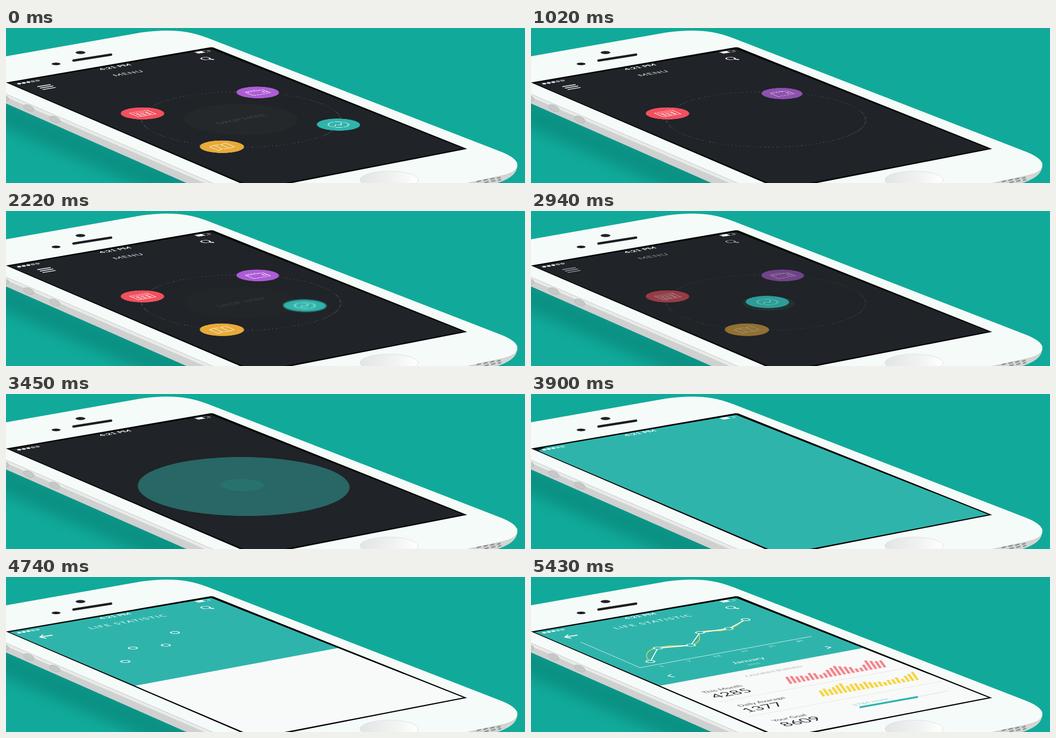
Write an HTML page that moves like this. It is 1000 px wide and 300 px high and loops after 6450 ms.

```html
<!DOCTYPE html>
<html lang="en">
<head>
<meta charset="utf-8">
<title>Phone menu</title>
<style>
html, body { margin: 0; width: 100%; height: 100%; overflow: hidden; background: #11aa9a; }
svg { display: block; width: 1000px; height: 300px; }
text { font-family: Lato, "Open Sans", sans-serif; text-anchor: middle; }
.line { fill: none; stroke: #fff; stroke-linecap: round; stroke-linejoin: round; }
</style>
</head>
<body>
<svg id="stage" viewBox="0 0 1000 300">
  <defs>
    <clipPath id="screen"><path d="M6.500 106.700 395.500 40.400 881 233.300 482 310.500Z"/></clipPath>
    <filter id="soft" x="-20%" y="-20%" width="140%" height="140%"><feGaussianBlur stdDeviation="13"/></filter>
    <linearGradient id="home" x1="0" x2="1"><stop offset="0" stop-color="#e2e5e3"/><stop offset=".55" stop-color="#eff2f0"/><stop offset="1" stop-color="#fff"/></linearGradient>
  </defs>
  <rect width="1000" height="300" fill="#11aa9a"/>
  <path d="M-30 125 400 310 310 330 -30 182Z" fill="#06695f" opacity=".38" filter="url(#soft)"/>
  <path d="M-2 120 420 300 350 301 -2 145Z" fill="#cfd0d0"/>
  <path d="M-2 120 430 300 385 301 -2 133Z" fill="#e9ebea"/>
  <path d="M860 301 985 260C987 280 975 291 944 301Z" fill="#d3d6d5"/>
  <path d="M-2 55 262 8.400C310 2 350 4 388 19L950 238C976 248 987 257 985 268 983 278 970 283 950 287L886 301H400L-2 127Z" fill="#f5fbf8"/>
  <path d="M-2 127 400 301M886 301 950 287C970 283 983 278 985 268" fill="none" stroke="#cbc4c7"/>
  <g fill="#c6c8c8" stroke="#b3b5b5" stroke-width=".8">
    <ellipse cx="-2" cy="136" rx="8" ry="5" transform="rotate(24 -2 136)"/>
    <ellipse cx="44" cy="155" rx="11" ry="5.5" transform="rotate(24 44 155)"/>
    <ellipse cx="94" cy="177" rx="11" ry="5.5" transform="rotate(24 94 177)"/>
  </g>
  <path d="M907 297.5l8-2M920 295l8-2M933 292.8l8-2M946 291l7-2M922 299.5l8-2M935 297l8-2M948 295l6-2" stroke="#8c9090" stroke-width="2.6"/>
  <ellipse cx="738" cy="294" rx="56" ry="17" fill="url(#home)" stroke="#dde1df"/>
  <path d="M130 63 202.500 51.500" stroke="#1d1d20" stroke-width="4.600" stroke-linecap="round"/>
  <ellipse cx="143.500" cy="47.500" rx="9.500" ry="2.900" fill="#222327"/>
  <ellipse cx="96.500" cy="69.500" rx="8.500" ry="2.500" fill="#1d1d20"/>
  <path d="M0 105.600 394 37.200 399 37.600 888.500 234 482 313.500Z" fill="#030405"/>
  <path d="M6.500 106.700 395.500 40.400 881 233.300 482 310.500Z" fill="#202327"/>
  <g id="view" clip-path="url(#screen)"></g>
</svg>
<script>
const LOOP = 6450, TEAL = '#2fb4ab', CX = 453, CY = 177;
const view = document.getElementById('view');

function add(parent, tag, attrs = {}) {
  const el = document.createElementNS('http://www.w3.org/2000/svg', tag);
  for (const k in attrs) el.setAttribute(k, attrs[k]);
  return parent.appendChild(el);
}

// Screen plane (320 x 568) seen in perspective
const [a, b, c, d, e, f, g, h] = [408.63, 450.82, 2, -66.79, 188.05, 106, .03173, -.06053];

// Local slant and scale of the plane around a stage point
function slant(x, y) {
  const ux = a - g * x, vx = b - h * x, uy = d - g * y, vy = e - h * y;
  const det = ux * vy - vx * uy;
  const u = ((x - c) * vy - vx * (y - f)) / det;
  const v = (ux * (y - f) - uy * (x - c)) / det;
  const w = g * u + h * v + 1;
  return `matrix(${[ux / w / 320, uy / w / 320, vx / w / 568, vy / w / 568, x, y]})`;
}
const at = (parent, x, y) => add(parent, 'g', { transform: slant(x, y) });
const group = (parent = view) => add(parent, 'g');
const line = (parent, path, width = 1.2, more = {}) =>
  add(parent, 'path', { d: path, class: 'line', 'stroke-width': width, ...more });

function label(parent, x, y, str, size, fill = '#fff', more = {}) {
  const t = add(at(parent, x, y), 'text', { y: size * .36, 'font-size': size, fill, ...more });
  t.textContent = str;
  return t;
}

// steps: [ms, value, easing to the next step]
function play(el, prop, steps) {
  const all = [...steps];
  if (all[0][0] > 0) all.unshift([0, all[0][1]]);
  all.push([LOOP, all[all.length - 1][1]]);
  el.animate(all.map(([t, v, easing = 'linear']) => ({ offset: t / LOOP, [prop]: v, easing })),
    { duration: LOOP, iterations: Infinity });
}
const fadeIn = (el, from, to) => play(el, 'opacity', [[from, 0], [to, 1]]);
const intro = [[0, 1], [90, 1], [90, 0]];

function search(parent) {
  add(at(parent, 384.5, 59), 'circle', { r: 6, class: 'line', 'stroke-width': 1.8 });
  line(parent, 'M392.500 60.300 400.500 61', 1.4);
}

// Menu
const ring = group();
add(at(ring, CX, CY), 'circle', { r: 126.5, fill: 'none', stroke: '#a4a7a8', 'stroke-width': 1.5, 'stroke-dasharray': '1 4.3', opacity: .8 });
const drop = group();
add(at(drop, CX, CY), 'circle', { r: 72, fill: '#25282b' });
label(drop, CX, CY - .5, 'DROP HERE', 13, '#45484b', { 'letter-spacing': .3 });

const menuHead = group();
line(menuHead, 'M61 113.500 85.500 109.500M66 116.300 90.500 112.300M71 119.100 95 115.100', 1.4);
label(menuHead, 235.5, 87.5, 'MENU', 14, '#e8eaea', { 'letter-spacing': .8 });
search(menuHead);

for (const el of [menuHead, ring])
  play(el, 'opacity', [...intro, [540, 1], [2820, 1], [3100, 0]]);
play(drop, 'opacity', [...intro, [1500, 0], [1740, 1], [2100, 1], [2640, 0]]);

// Growing disc
const flood = add(at(view, 458, 179), 'circle', { r: 1, fill: TEAL });
play(flood, 'transform', [[2820, 'scale(27)', 'ease-in'], [3450, 'scale(134)'], [3900, 'scale(330)'], [4020, 'scale(400)']]);
play(flood, 'opacity', [[2820, 0], [3450, .47], [3880, 1]]);

// Round buttons
const zoom = s => `translate(${CX}px,${CY}px) scale(${s}) translate(${-CX}px,${-CY}px)`;
function button(x, y, fill, start, icon) {
  const pop = group(), move = group(pop), spot = at(move, x, y);
  const disc = add(spot, 'circle', { r: 27.6, fill });
  const sign = line(spot, icon, 1.2, { opacity: .9 });
  const ease = 'cubic-bezier(.25,.6,.4,1)';
  play(pop, 'transform', [[0, zoom(1)], [90, zoom(1)], [90, zoom(.8)], [start, zoom(.8), ease], [start + 210, zoom(1)]]);
  const shown = [...intro, [start, 0, ease], [start + 210, 1]];
  return { pop, move, disc, sign, shown };
}
const others = [
  button(263, 165.3, '#f2505f', 720,
    'M-13-10H13V11H-13ZM-13-5H13M-9-1h3v3h-3zM-2-1h3v3h-3zM5-1h3v3h-3zM-9 5h3v3h-3zM-2 5h3v3h-3zM5 5h3v3h-3z'),
  button(485, 124.7, '#ad5cd5', 930,
    'M-13-7H13V10H-13ZM-13-7-11-11H5L8-7M13-1H7V4H13'),
  button(416, 229.8, '#e8ab3a', 1370,
    'M-13-8-5-11 4-8 13-11V8L4 11-5 8-13 11ZM-5-11V8M4-8V11')
];
for (const o of others) play(o.pop, 'opacity', [...o.shown, [2820, 1], [3100, 0]]);

const stat = button(640.5, 187, TEAL, 1140,
  'M-13 0A13 13 0 1 1 13 0A13 13 0 1 1-13 0M-8 4-3-2 2 3 8-5');
play(stat.pop, 'opacity', stat.shown);
play(stat.move, 'transform', [[2100, 'translate(0px,0px)', 'ease'], [2640, 'translate(-185px,-11px)']]);
play(stat.move, 'filter', [[2100, 'blur(0px)'], [2190, 'blur(.9px)'], [2280, 'blur(.9px)'], [2460, 'blur(0px)']]);
play(stat.disc, 'opacity', [[2820, 1], [3450, .14], [3750, 0]]);
play(stat.sign, 'opacity', [[2820, .9], [3060, 0]]);

// Statistic page
const panel = add(view, 'path', { d: 'M247 210.800 642 137 1100 320 500 420Z', fill: '#f7faf8' });
play(panel, 'transform', [[4140, 'translate(300px,130px)', 'cubic-bezier(.3,0,.2,1)'], [4530, 'translate(0px,0px)']]);
play(panel, 'opacity', [[4140, 0], [4140, 1]]);

const statHead = group();
line(statHead, 'M65 116.300 89 112.600M71 112 65 116.300 77 118.500', 1.6);
label(statHead, 235, 86.5, 'LIFE STATISTIC', 14.2, '#f2fbfa', { 'letter-spacing': 1.7 });
search(statHead);
fadeIn(statHead, 4260, 4530);

const axes = group();
line(axes, 'M96 126 210 175.500 540 115', 1, { opacity: .75 });
fadeIn(axes, 4800, 4980);
for (let i = 0; i < 6; i++) {
  const t = label(view, 252 + 53.2 * i, 173 - 9.8 * i, 1 + 6 * i, 9, '#e4f6f4');
  fadeIn(t, 4860 + 40 * i, 5000 + 40 * i);
}

const dots = [[230, 163.5], [244.5, 137.5], [308, 132], [325.5, 107.5], [381, 100], [413.5, 82.5]];
const curve = line(view, 'M230 163.500C214 153 226 138 244.500 137.500 265 130 290 135 308 132 336 125 319 110 325.500 107.500 345 99 362 109 381 100 403 95 401 85 413.500 82.500',
  1.8, { style: 'stroke:#d8d04c', pathLength: 1, 'stroke-dasharray': '1 1' });
const trend = line(view, 'M' + dots.join('L'), 1.8, { pathLength: 1, 'stroke-dasharray': '1 1' });
for (const [el, from] of [[trend, 4890], [curve, 4980]]) {
  play(el, 'strokeDashoffset', [[from, 1, 'ease-in-out'], [from + 330, 0]]);
  play(el, 'opacity', [[from, 0], [from, 1]]);
}
dots.forEach(([x, y], i) => {
  const o = add(at(view, x, y), 'circle', { r: 5.5, fill: TEAL, stroke: '#fff', 'stroke-width': 1.9 });
  fadeIn(o, 4380 + 105 * i, 4425 + 105 * i);
});

const month = group();
label(month, 418, 161.5, 'January', 14.3);
label(month, 429, 168.5, '2015', 8, '#bfe8e4');
line(month, 'M270 188.500 263.500 191.500 276 193.500M567 134.500 578 136 571 139', 1.1);
fadeIn(month, 4950, 5190);

const table = group();
label(table, 467.5, 182.5, 'CALORIES BURNED', 9.6, '#a9acab');
line(table, 'M362 242 726 175.500M420 270 790 202', .8, { style: 'stroke:#f0dfe0' });
fadeIn(table, 4890, 5130);

[['This Month', 368, 217, '4285', 385, 225],
 ['Daily Avarage', 443.5, 241.5, '1377', 446, 252],
 ['Your Goal', 497, 272.5, '8609', 519, 279.5]].forEach(([name, x, y, num, nx, ny], i) => {
  const row = group();
  label(row, x, y, name, 11.7, '#4b4e50');
  label(row, nx, ny, num, 24.3, '#2f3234');
  fadeIn(row, 4950 + 90 * i, 5160 + 90 * i);
});

// Leaning columns on a slanted base line
function bars(x, y, fill, heights, start) {
  const base = add(view, 'g', { transform: `matrix(1 -.176 .7 1 ${x} ${y})` });
  [...heights].forEach((n, i) => {
    const tall = n * 2.2;
    const bar = add(base, 'rect', { x: i * 8.6, y: -tall, width: 5, height: tall, fill });
    play(bar, 'transform', [[start + 9 * i, 'scaleY(0)', 'ease-out'], [start + 9 * i + 180, 'scaleY(1)']]);
  });
}
bars(499, 207, '#f4838a', '6655465346787653358766', 4950);
bars(562, 231.5, '#f6d43f', '5656785665654434453567', 5020);

const goal = group();
label(goal, 653.5, 242, '3784 more', 11, '#84cfc9');
line(goal, 'M744 232 803 220.500', .9, { style: 'stroke:#d5dedb' });
fadeIn(goal, 5130, 5340);
const gauge = line(view, 'M634.500 252 744 232.300', 3.6, { style: 'stroke:' + TEAL, pathLength: 1, 'stroke-dasharray': '1 1' });
play(gauge, 'strokeDashoffset', [[5130, 1, 'ease-out'], [5410, 0]]);
play(gauge, 'opacity', [[5130, 0], [5130, 1]]);

// Status bar
const status = group();
label(status, 210, 75.5, '4:21 PM', 12.6, '#fff', { 'font-weight': 700 });
for (let i = 0; i < 5; i++)
  add(at(status, 25.5 + 8.8 * i, 107.8 - 1.5 * i), 'circle', { r: 2.5, fill: i < 3 ? '#fff' : 'none', stroke: '#fff', 'stroke-width': .7 });
const battery = at(status, 379, 46);
line(battery, 'M-10-4.500H9V4.500H-10ZM11-1V1', .9);
add(battery, 'rect', { x: -9, y: -3.8, width: 10, height: 7.6, fill: '#fff' });
</script>
</body>
</html>
```
